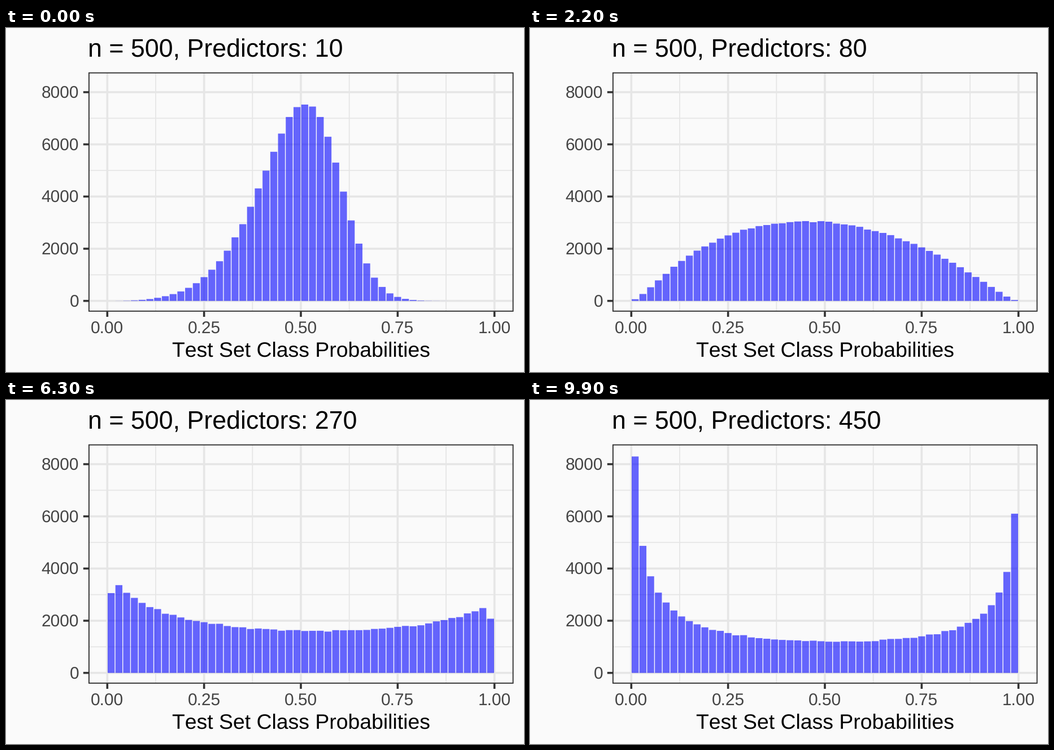
Animation, 917 px wide and 611 px high, one loop 10000 ms. Source, as a matplotlib script:

```python
import math
import numpy as np
import matplotlib.pyplot as plt
from matplotlib.animation import FuncAnimation
from matplotlib.patches import Rectangle

plt.rcParams.update({"font.family": "Liberation Sans", "text.hinting": "none",
                     "text.kerning_factor": 6, "path.snap": False})

W, H, DPI = 917, 611, 100
BINS, TOTAL = 50, 99_400
FRAMES, INTERVAL = 100, 100
STATES = np.arange(10, 451, 10)
PX = 72 / DPI  # points per pixel
EM = 37.33     # base text size in pixels

EDGES = np.linspace(0, 1, BINS + 1)
Z = np.linspace(-6, 6, 2001)

# Spread of the class logits at a few predictor counts
COUNTS = [10, 50, 120, 175, 270, 350, 450]
SPREADS = [0.425, 0.813, 1.236, 1.589, 1.949, 2.31, 2.643]


def normal_cdf(z):
    return 0.5 * (1 + math.erf(z / math.sqrt(2)))


def histogram(predictors):
    """Bin a nearly normal logit distribution that widens with the predictors."""
    center = -0.0106 * math.sqrt(predictors)
    spread = np.interp(math.sqrt(predictors), np.sqrt(COUNTS), SPREADS)
    skew = np.interp(predictors, [10, 50], [-0.044, 0])
    logits = center + spread * Z + skew * Z ** 2 + 0.0115 * Z ** 3
    inner = EDGES[1:-1]
    z_edges = np.interp(np.log(inner / (1 - inner)), logits, Z)
    counts = np.diff([0, *map(normal_cdf, z_edges), 1]) * TOTAL
    noise = np.random.default_rng(int(predictors)).normal(0, 0.45, BINS)
    return np.maximum(counts + noise * np.sqrt(counts), 0)


HISTOGRAMS = [histogram(p) for p in STATES]


def px(value):
    return 179.3 + 685.4 * value


def py(count):
    return 484.7 - 0.04634 * count


fig = plt.figure(figsize=(W / DPI, H / DPI), dpi=DPI, facecolor="#fafafa")
ax = fig.add_axes([0, 0, 1, 1])
ax.set(xlim=(0, W), ylim=(H, 0))
ax.axis("off")

LEFT, RIGHT, TOP, BOTTOM = 146.9, 897.6, 79.7, 502.9
INK, LABEL_INK, GRID = "#333333", "#444444", "#e6e6e6"


def line(x, y, width, color, z):
    ax.plot(x, y, color=color, lw=width * PX, solid_capstyle="butt", zorder=z)


def label(x, y, text, size, color="black", ha="center"):
    return ax.text(x, y, text, fontsize=size * PX, color=color, ha=ha, va="baseline")


def grid(x_values, y_values, width, z):
    for v in x_values:
        line([px(v)] * 2, [TOP, BOTTOM], width, GRID, z)
    for c in y_values:
        line([LEFT, RIGHT], [py(c)] * 2, width, GRID, z)


x_ticks, y_ticks = np.arange(5) / 4, np.arange(0, 8001, 2000)
grid(x_ticks[:-1] + 0.125, y_ticks[:-1] + 1000, 1.8, 1)
grid(x_ticks, y_ticks, 3.6, 2)

for v in x_ticks:
    line([px(v)] * 2, [503.8, 513], 3.6, INK, 5)
    label(px(v), 543, f"{v:.2f}", 0.8 * EM, LABEL_INK)
for c in y_ticks:
    line([136.8, 146], [py(c)] * 2, 3.6, INK, 5)
    label(129.2, py(c) + 10.6, str(c), 0.8 * EM, LABEL_INK, "right")

ax.add_patch(Rectangle((LEFT, TOP), RIGHT - LEFT, BOTTOM - TOP, fill=False,
                       ec=INK, lw=1.9 * PX, zorder=5))
label(522.2, 585, "Test Set Class Probabilities", EM)
title = label(145, 51, "", 1.2 * EM, ha="left")

bars = [ax.add_patch(Rectangle((px(e + 0.001), py(0)), px(0.018) - px(0), 0,
                               fc=(0, 0, 1, 0.6), lw=0, zorder=3)) for e in EDGES[:-1]]


def state_position(i):
    """Early states hold for two frames, later ones for one; one blend between."""
    if i <= 33:
        return (i + 1) // 3 + (0.5 if i % 3 == 1 else 0)
    return 11 + (i - 33) / 2


def update(i):
    position = state_position(i)
    k = int(position)
    counts = HISTOGRAMS[k]
    if position > k:
        counts = (counts + HISTOGRAMS[k + 1]) / 2
    for bar, count in zip(bars, counts):
        bar.set_height(py(count) - py(0))
    title.set_text(f"n = 500, Predictors: {STATES[k]}")
    return [*bars, title]


anim = FuncAnimation(fig, update, frames=FRAMES, interval=INTERVAL, repeat=True, repeat_delay=0)
plt.show()
```
